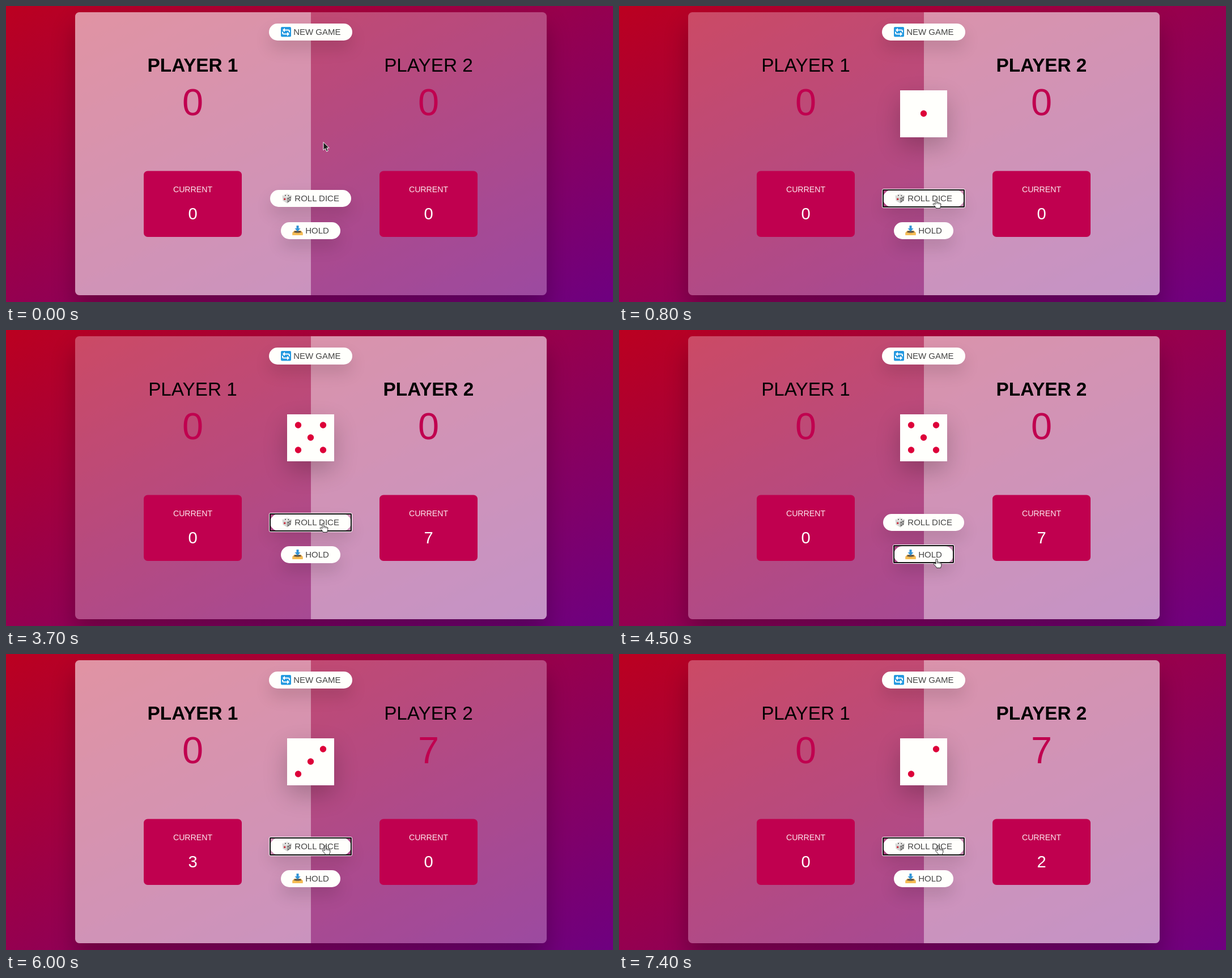
Animation of 1071x523 px, one loop 8000 ms. Source, as an HTML page:

```html
<!DOCTYPE html>
<html lang="en">
<head>
<meta charset="utf-8">
<title>Dice game</title>
<style>
html, body { margin: 0; width: 100%; height: 100%; overflow: hidden; }
body { position: relative; background: linear-gradient(to top left, #6e0080, #bb0020); }
main {
  position: absolute; left: 121.5px; top: 11px; width: 832px; height: 499.5px;
  display: flex; overflow: hidden; border-radius: 7.5px;
  background: rgba(255,255,255,.29); box-shadow: 0 25px 42px rgba(0,0,0,.25);
}
section { flex: 1; }
section.active { background: rgba(255,255,255,.4); }
.lift { position: absolute; background: #fffffc; }
.btn { height: 30px; border-radius: 15px; box-shadow: 0 14.6px 29px rgba(0,0,0,.13); }
#die { left: 496px; top: 148.5px; width: 83px; height: 83px; box-shadow: 0 16.6px 41.6px rgba(0,0,0,.22); }
svg { position: absolute; left: 0; top: 0; font-family: "Liberation Sans", Arial, sans-serif; }
.mid { text-anchor: middle; }
.name { font-size: 33.3px; }
.name.active { font-weight: bold; }
.score { font-size: 66.6px; fill: #c0004f; }
.label { font-size: 14.15px; fill: #fbe6ee; }
.current { font-size: 29.1px; fill: #fff; }
.cap { font-size: 15px; fill: #444; }
</style>
</head>
<body>
<main><section></section><section></section></main>
<div class="lift btn" style="left:464px;top:31px;width:147px"></div>
<div class="lift btn" style="left:466px;top:325px;width:143px"></div>
<div class="lift btn" style="left:485px;top:381.5px;width:105px"></div>
<div class="lift" id="die"></div>
<svg width="1071" height="523" viewBox="0 0 1071 523">
  <g id="players"></g>
  <g id="pips" fill="#dd0039"></g>
  <text class="cap" x="507.2" y="51">NEW GAME</text>
  <text class="cap" x="509.3" y="345">ROLL DICE</text>
  <text class="cap" x="528.2" y="402">HOLD</text>

  <g transform="translate(485 37)">
    <rect width="18" height="17.5" rx="2" fill="#2499e0"/>
    <g fill="none" stroke="#fff" stroke-width="2">
      <path d="M15 9.5V7.5a2 2 0 0 0-2-2H6M3 8.5v2a2 2 0 0 0 2 2h7"/>
      <path d="M7 1.8v7.4L2.8 5.5zM11 8.8v7.4l4.2-3.7z" fill="#fff" stroke="none"/>
    </g>
  </g>

  <g transform="translate(487.5 331.5)">
    <path d="M8.5 0 16 3.5 15.3 12.5 8.5 17 1 12.5 0 3.5z" fill="#d5d5d3"/>
    <path d="M8 7.3 16 3.5 15.3 12.5 8.5 17z" fill="#aaa9a8"/>
    <path d="M8.5 0 16 3.5 8 7.3 0 3.5z" fill="#e9e9e7"/>
    <g fill="#444">
      <circle cx="5.5" cy="3.3" r="1"/><circle cx="10.8" cy="3.4" r="1"/>
      <circle cx="10.3" cy="8.8" r="1"/><circle cx="13.8" cy="7" r="1"/>
      <circle cx="10.5" cy="13.4" r="1"/><circle cx="13.6" cy="11.3" r="1"/>
    </g>
    <circle cx="4.2" cy="9.8" r="1.7" fill="#c92a3c"/>
  </g>

  <g transform="translate(505.5 388)">
    <path d="M3 9h12l3 3.5V17H0v-4.5z" fill="#e9ac47"/>
    <path d="M4 9.5h10l1.5 3h-13z" fill="#55504c"/>
    <path d="M0 12.5h5.5l1 1.8h5l1-1.8H18V17H0z" fill="#f6bd55"/>
    <path d="M7 0h4v5h3l-5 5.6L4 5h3z" fill="#3294d6"/>
  </g>

  <g id="ring" fill="none">
    <rect stroke="#fff" rx="2"/>
    <rect stroke="#101010" stroke-width="2" rx="1"/>
  </g>
  <path id="arrow" d="M0 0V14.2L3.3 11.2 5.7 16.6 8.2 15.5 5.9 10.3H10.2z" fill="#1a1a1a" stroke="#fff"/>
  <g id="hand" stroke="#222" stroke-linejoin="round">
    <path fill="#fff" d="M-1.5 9V1.5a1.4 1.4 0 0 1 2.8 0V6c.8-.9 2.4-.7 2.6.4.8-.6 2.2-.3 2.4.7.9-.4 2 .1 2 1.2V11c0 2-1 2.6-1.2 4.8H0C-.5 13.5-4 11-5.2 9c-.6-1.2.8-2 1.8-1.2z"/>
    <path fill="none" stroke-width=".8" d="M1.3 6v2.5M3.9 6.6v2.2M6.3 7.3v1.9"/>
  </g>
</svg>
<script>
const $ = s => document.querySelector(s);
const all = s => [...document.querySelectorAll(s)];
const LOOP = 8000;
const RINGS = { roll: [466, 325, 143, 30], hold: [485, 381, 105, 30] };

// Each entry changes part of the state from its time on.
const steps = [
  [0, { active: 0, scores: [0, 0], current: [0, 0], die: 0, focus: '', hand: false, at: [560, 240.5] }],
  [300, { at: [560, 248] }],
  [400, { at: [560, 270] }],
  [500, { at: [560, 298] }],
  [600, { at: [559.5, 326], hand: true }],
  [700, { at: [559.5, 341.5] }],
  [800, { active: 1, die: 1, focus: 'roll' }],
  [2200, { current: [0, 2] }],
  [2500, { die: 2 }],
  [3700, { die: 5, current: [0, 7] }],
  [4100, { at: [560, 350] }],
  [4200, { at: [560, 371] }],
  [4300, { at: [560.5, 392] }],
  [4400, { at: [560.5, 404.5] }],
  [4500, { focus: 'hold' }],
  [4900, { active: 0, scores: [0, 7], current: [0, 0], at: [560.5, 377.5] }],
  [5000, { at: [562, 354] }],
  [5100, { at: [563.5, 338.5] }],
  [5600, { current: [3, 0], focus: 'roll' }],
  [6000, { die: 3 }],
  [6500, { active: 1, die: 1, current: [0, 0] }],
  [7400, { die: 2, current: [0, 2] }]
];

$('#players').innerHTML = [329.5, 745.5].map((x, i) => `
  <text class="mid name" x="${x}" y="116">PLAYER ${i + 1}</text>
  <text class="mid score" x="${x}" y="193"></text>
  <rect x="${x - 86.5}" y="291.5" width="173" height="116.5" rx="7" fill="#c0004f"/>
  <text class="mid label" x="${x}" y="329">CURRENT</text>
  <text class="mid current" x="${x}" y="377"></text>`).join('');

const sections = all('section'), names = all('.name');
const scores = all('.score'), currents = all('.current');
const rings = all('#ring rect');

function pips(n) {
  const spots = [];
  if (n % 2) spots.push([0, 0]);
  if (n > 1) spots.push([1, -1], [-1, 1]);
  if (n > 3) spots.push([-1, -1], [1, 1]);
  return spots.map(([x, y]) =>
    `<circle cx="${537.5 + 22 * x}" cy="${190 + 22 * y}" r="5.7"/>`).join('');
}

function grow(rect, [x, y, w, h], d) {
  const box = { x: x - d, y: y - d, width: w + 2 * d, height: h + 2 * d };
  for (const k in box) rect.setAttribute(k, box[k]);
}

const show = (el, on) => { el.style.display = on ? '' : 'none'; };

function draw(s) {
  for (const i of [0, 1]) {
    sections[i].classList.toggle('active', s.active === i);
    names[i].classList.toggle('active', s.active === i);
    scores[i].textContent = s.scores[i];
    currents[i].textContent = s.current[i];
  }
  show($('#die'), s.die);
  $('#pips').innerHTML = pips(s.die);
  show($('#ring'), s.focus);
  if (s.focus) rings.forEach((r, i) => grow(r, RINGS[s.focus], i ? 0 : 1.5));
  show($('#hand'), s.hand);
  show($('#arrow'), !s.hand);
  $(s.hand ? '#hand' : '#arrow').setAttribute('transform', `translate(${s.at})`);
}

const start = performance.now();
let last = -1;
function frame(now) {
  const t = Math.max(0, now - start) % LOOP;
  const past = steps.filter(([at]) => at <= t);
  if (past.length !== last) {
    last = past.length;
    draw(Object.assign({}, ...past.map(p => p[1])));
  }
  requestAnimationFrame(frame);
}
frame(start);
</script>
</body>
</html>
```
